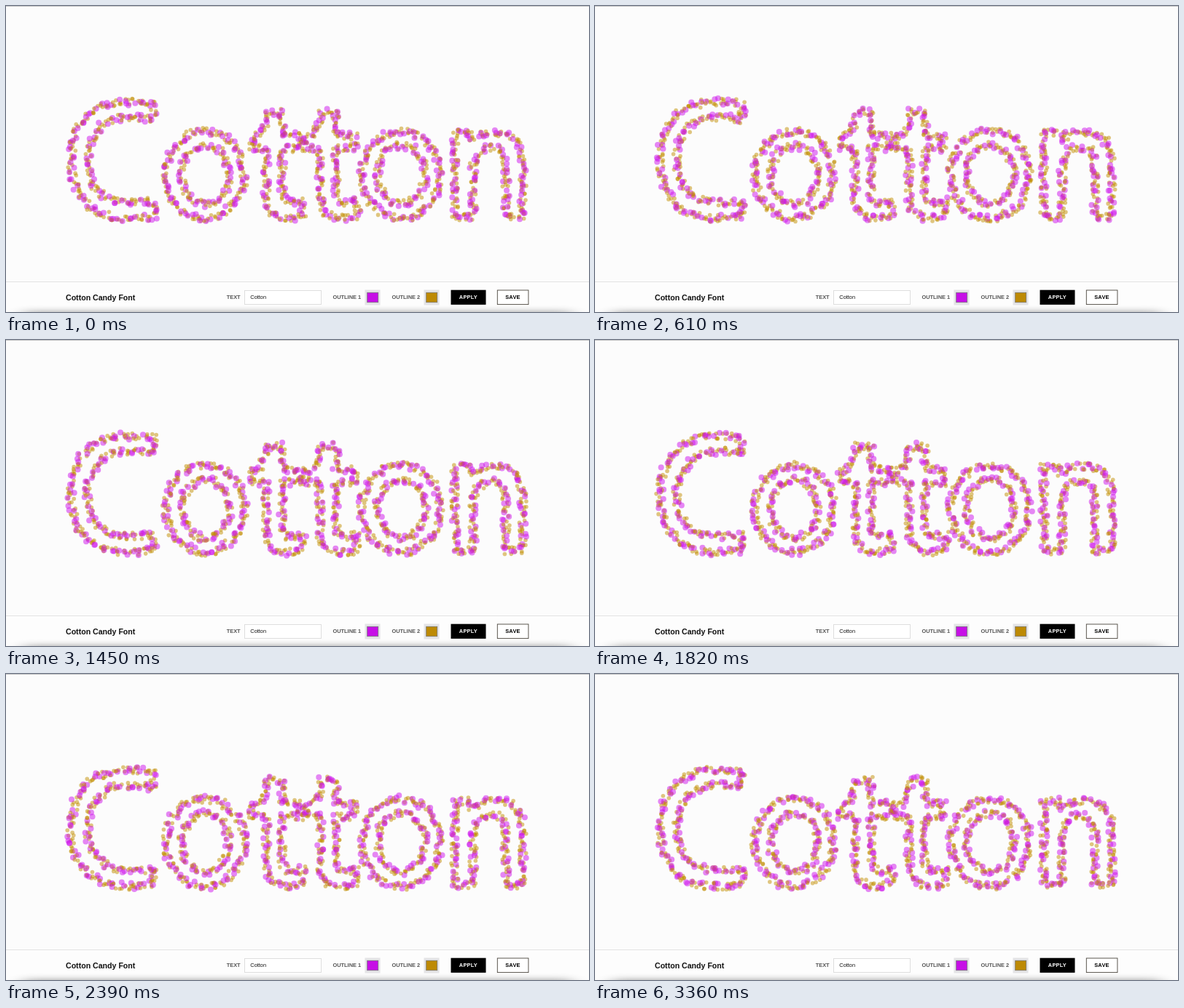
Recreate the animation shown at these times as an HTML page with a canvas. Size 800 by 421 pixels, loop 3.39 s.

```html
<!DOCTYPE html>
<html lang="en">
<head>
<meta charset="utf-8">
<title>Cotton Candy Font</title>
<style>
  html, body { margin: 0; width: 100%; height: 100%; overflow: hidden; background: #fcfcfc; }
  canvas, svg { position: absolute; left: 0; top: 0; display: block; }
  text { font: bold 7.4px "Liberation Sans", Arial, sans-serif; }
  .title { font-size: 10.6px; fill: #111; }
  .label { fill: #555; }
  .value { font-weight: normal; fill: #111; }
  .button { letter-spacing: .25px; }
</style>
</head>
<body>
<canvas id="stage" width="800" height="421"></canvas>
<svg width="800" height="421" viewBox="0 0 800 421">
  <defs>
    <filter id="blur" x="-10%" y="-300%" width="120%" height="700%">
      <feGaussianBlur stdDeviation="12 5"/>
    </filter>
  </defs>
  <rect width="800" height="1" fill="#c9c9c9"/>
  <rect y="379" width="800" height="42" fill="#fdfdfd"/>
  <rect y="379" width="800" height="1" fill="#e2e2e2"/>
  <rect x="24" y="421" width="752" height="14" fill="#000" opacity=".4" filter="url(#blur)"/>

  <text class="title" x="82" y="404.6">Cotton Candy Font</text>
  <text class="label" x="302.7" y="403.4">TEXT</text>
  <rect x="327.5" y="391.5" width="105" height="19" fill="#fff" stroke="#dedede"/>
  <text class="value" x="335.3" y="403.4">Cotton</text>

  <text class="label" x="448.5" y="403.4">OUTLINE 1</text>
  <rect x="492.5" y="390.5" width="21" height="21" fill="#e4e4e6"/>
  <rect x="495.7" y="394.3" width="15" height="13.4" fill="#c60fe6" stroke="#77707c" stroke-width=".8"/>

  <text class="label" x="529.5" y="403.4">OUTLINE 2</text>
  <rect x="573.5" y="390.5" width="21" height="21" fill="#e4e4e6"/>
  <rect x="576.7" y="394.3" width="15" height="13.4" fill="#bd8a05" stroke="#7a7468" stroke-width=".8"/>

  <rect x="610.5" y="390.7" width="48" height="20.2" fill="#000"/>
  <text class="button" x="621.8" y="403.4" fill="#fff">APPLY</text>
  <rect x="674.3" y="391" width="42.6" height="19.6" fill="#fff" stroke="#4a453c" stroke-width=".9"/>
  <text class="button" x="685.2" y="403.4" fill="#000">SAVE</text>
</svg>
<script>
const LOOP = 3390, STEP = 30, SPACING = 6, JITTER = 5;
const PINK = { color: 'rgba(205, 15, 235, .5)', r: 4 };
const GOLD = { color: 'rgba(194, 142, 0, .5)', r: 2.8 };

const C = 'M202 135Q186 132 165 132C117 132 89 165 89 212C89 262 117 292 165 292Q188 292 203 288' +
  'L203 268Q188 270 168 270C133 270 112 249 112 212C112 176 134 153 168 153Q188 153 202 157Z';
const O = 'M219 232A54 60 0 1 1 327 232A54 60 0 1 1 219 232Z' +
  'M241 232A32.5 40 0 1 1 306 232A32.5 40 0 1 1 241 232Z';
const T = 'M359 146L379 146L379 178L404 178L404 196L379 196L379 256Q380 271 392 271L407 268L408 287' +
  'Q398 292 385 292Q357 290 357 262L357 196L337 196L337 181Q355 178 359 146Z';
const N = 'M616 175L637 175L639 183Q652 174 670 174Q709 174 709 216L709 290L686 290L686 222' +
  'Q686 194 666 194Q641 196 641 226L641 290L616 290Z';
const word = [[C, 0], [O, 0], [T, 0], [T, 74], [O, 269], [N, 0]];

function sample([d, dx]) {
  const path = document.createElementNS('http://www.w3.org/2000/svg', 'path');
  path.setAttribute('d', d);
  const length = path.getTotalLength();
  const count = Math.round(length / SPACING);
  return Array.from({ length: count }, (_, i) => {
    const p = path.getPointAtLength(i * length / count);
    return { x: p.x + dx, y: p.y };
  });
}

function seeded(seed) {
  return () => {
    seed = (seed + 0x6D2B79F5) | 0;
    let t = Math.imul(seed ^ (seed >>> 15), 1 | seed);
    t = (t + Math.imul(t ^ (t >>> 7), 61 | t)) ^ t;
    return ((t ^ (t >>> 14)) >>> 0) / 4294967296;
  };
}

const points = word.flatMap(sample);
const ctx = document.getElementById('stage').getContext('2d');

function dot(p, { color, r }, random) {
  const shift = () => (random() * 2 - 1) * JITTER;
  ctx.fillStyle = color;
  ctx.beginPath();
  ctx.arc(p.x + shift(), p.y + shift(), r, 0, Math.PI * 2);
  ctx.fill();
}

function draw(step) {
  const random = seeded(step * 7919 + 17);
  ctx.clearRect(0, 0, 800, 421);
  for (const p of points) {
    dot(p, GOLD, random);
    dot(p, GOLD, random);
    dot(p, PINK, random);
  }
}

let shown = -1;
function tick() {
  const step = Math.floor(performance.now() % LOOP / STEP);
  if (step !== shown) draw(shown = step);
  requestAnimationFrame(tick);
}
tick();
</script>
</body>
</html>
```
